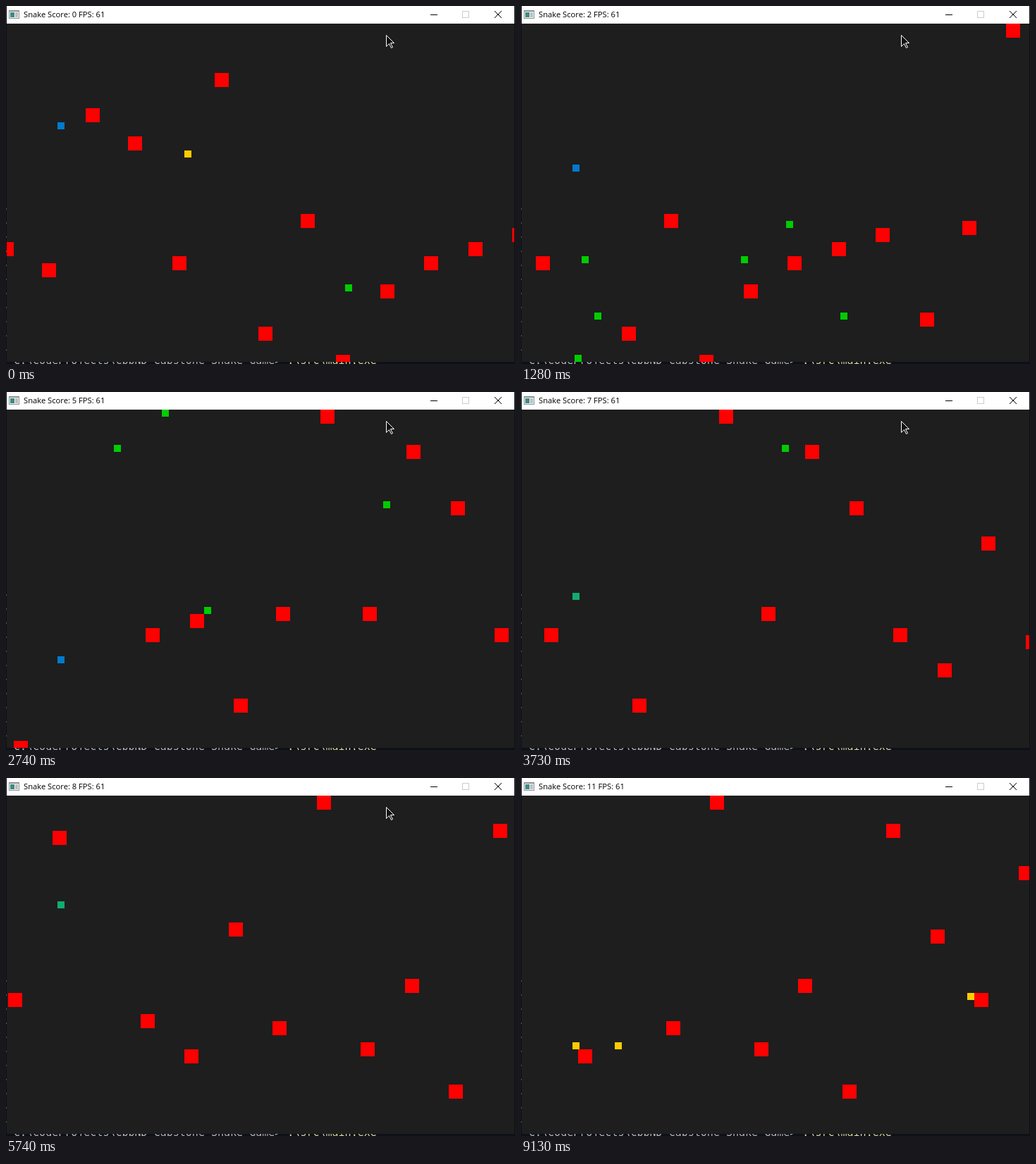
Animation of 722x508 px, one loop 9.28 s. Source, as an HTML page with a canvas:

```html
<!DOCTYPE html>
<html lang="en">
<head>
<meta charset="utf-8">
<title>Snake</title>
<style>
  html, body { margin: 0; width: 100%; height: 100%; overflow: hidden; background: #0c1018; }
  canvas { display: block; width: 722px; height: 508px; }
</style>
</head>
<body>
<canvas id="stage" width="722" height="508"></canvas>
<script>
const ctx = document.getElementById('stage').getContext('2d');
const LOOP = 9280;
const PLAYER_X = 73;
const SPEED = 0.16702; // enemy px per ms
const STEP = 2.5;      // enemy px per game tick
const END = 1132.5;    // scroll at game over

const rowY = row => 25 + 10 * row;
const scrollAt = t => Math.min(END, Math.round(t * SPEED / STEP) * STEP);
const overlaps = (y, enemyY) => y > enemyY - 10 && y < enemyY + 20;
const random = n => Math.abs(Math.sin(n * 12.9898) * 43758.5453) % 1;

function lerp(points, at) {
  const i = Math.max(1, points.findIndex(([p]) => at <= p));
  const [a, from] = points[i - 1], [b, to] = points[i];
  return from + (to - from) * (at - a) / (b - a);
}

// The player arrives at each stop [scroll, y] and fires there.
const stops = [
  [-22.5, 205], [10, 145], [37.5, 95], [250, 295], [280, 355], [300, 395],
  [487.5, 315], [507.5, 315], [527.5, 315], [735, 55], [945, 155], [975, 205],
  [1062.5, 305], [1095, 375], [1125, 375]
];

// It waits, then leaves just in time, twice as fast as the enemies.
function playerY(d) {
  const i = stops.findIndex(([at]) => d < at);
  if (i < 1) return stops[stops.length - 1][1];
  const from = stops[i - 1][1], [at, to] = stops[i];
  const y = to + Math.sign(from - to) * Math.min(Math.abs(from - to), 2 * (at - d));
  return rowY(Math.round((y - 25) / 10));
}

// Enemies enter one by one, about 25 ticks apart: [index, x at the start].
const entry = [[0, -9], [7, 418.5], [8, 468.5], [13, 781], [16, 963.5], [30, 1838.5]];
const rows = [
  31, 34, 12, 16, 33, 7, 43, 27, 47, 37, 33, 31, 29, 41, 28, 0,
  28, 5, 13, 31, 36, 18, 32, 0, 35, 26, 41, 4, 19, 28, 10
];
const enemies = rows.map((row, i) => {
  const x = Math.round((lerp(entry, i) - 1) / STEP) * STEP + 1;
  const y = rowY(row);
  const rammed = overlaps(playerY(x - 75), y) && x - 75 > 0;
  return { x, y, end: rammed ? x - 73 : Infinity };
});

// Each shot stops at the first enemy in its lane.
const shots = stops.map(([fired, y]) => {
  const target = enemies.find(e => e.end > fired && e.x > fired + PLAYER_X && overlaps(y, e.y));
  const hit = target ? (target.x - PLAYER_X - 10 + 8 * fired) / 9 : Infinity;
  if (hit > fired + 80) return { fired, y, end: Infinity };
  target.end = hit;
  return { fired, y, end: hit };
});

// Every enemy fires twice on its way across.
const enemyShots = enemies.flatMap((e, i) => [0, 1].map(n => {
  const from = 720 * random(2 * i + n + 1);
  return { from, fired: e.x - from, y: e.y };
}).filter(shot => shot.fired < e.end));

function rect(color, x, y, w, h) {
  ctx.fillStyle = color;
  ctx.fillRect(x, y, w, h);
}

const box = (color, x, y, size) => rect(color, Math.trunc(x), y, size, size);

function path(...points) {
  ctx.beginPath();
  points.forEach(([x, y]) => ctx.lineTo(x, y));
}

function text(str, x, y, font, color) {
  ctx.font = font;
  ctx.fillStyle = color;
  ctx.fillText(str, x, y);
  return x + ctx.measureText(str).width;
}

function clipped(x, y, w, h, paint) {
  ctx.save();
  ctx.beginPath();
  ctx.rect(x, y, w, h);
  ctx.clip();
  paint();
  ctx.restore();
}

function drawTerminal() {
  const mono = '15px "DejaVu Sans Mono", monospace';
  rect('#0c1018', 0, 0, 722, 508);
  for (let y = 287; y < 500; y += 20) rect('#555', 0, y, 1, 2);
  clipped(0, 505, 722, 3, () => {
    const x = text('C:\\CodeProjects\\CppND-Capstone-Snake-Game> ', 11, 508, mono, '#b4b4b4');
    text('.\\src\\main.exe', x, 508, mono, '#d9d3a0');
  });
}

function drawTitleBar(t) {
  // The caption refreshes once a second.
  const second = Math.floor((t - 260) / 1000);
  const d = scrollAt(260 + 1000 * second);
  const score = second < 0 ? 0 : shots.filter(shot => shot.end <= d).length;
  const fps = second === 4 ? 62 : 61;

  rect('#fff', 1, 0, 720, 25);
  rect('#8a9298', 4, 6, 15, 12);
  rect('#f2f4f5', 5, 8, 13, 9);
  rect('#3f8a80', 6, 9, 6, 7);
  rect('#b9c0c4', 13, 9, 4, 7);
  text(`Snake Score: ${score} FPS: ${fps}`, 25, 16, '11.2px "Open Sans", sans-serif', '#000');

  ctx.lineWidth = 1;
  ctx.strokeStyle = '#ccc';
  ctx.strokeRect(647.5, 7.5, 9, 9);
  rect('#000', 602, 12, 10, 1);
  ctx.strokeStyle = '#000';
  path([693, 7], [703, 17]);
  ctx.stroke();
  path([703, 7], [693, 17]);
  ctx.stroke();
}

function drawGame(t) {
  const d = scrollAt(t);
  rect('#1e1e1e', 1, 25, 720, 480);
  for (const { from, fired, y } of enemyShots) {
    if (d >= fired) box('#00cc00', from - 4 * (d - fired), y, 10);
  }
  for (const { x, y, end } of enemies) {
    if (d < end) box('#ff0000', x - d, y, 20);
  }
  for (const { fired, y, end } of shots) {
    if (d >= fired && d < end) box('#ffcc00', PLAYER_X + 8 * (d - fired), y, 10);
  }
  const color = t < 3700 ? '#007acc' : t < 7020 ? '#10ac70' : '#ffcc00';
  box(color, PLAYER_X, playerY(d), 10);
}

// The pointer rests, then swings out through the bottom right in nine jumps.
function drawCursor(t) {
  const p = Math.max(0, Math.ceil((t - 8659) / 470 * 9) / 9);
  if (p > 1 || t >= 9130) return;
  ctx.save();
  ctx.translate(Math.round(539 - 161 * p + 361 * p * p) + 0.5, Math.round(41 + 470 * p * p) + 0.5);
  path([0, 0], [0, 16], [4, 12], [7, 18], [9, 17], [6, 11], [11, 11]);
  ctx.closePath();
  ctx.fillStyle = '#101010';
  ctx.fill();
  ctx.strokeStyle = '#fff';
  ctx.lineWidth = 1;
  ctx.lineJoin = 'round';
  ctx.stroke();
  ctx.restore();
}

const start = performance.now();

function draw() {
  const t = (performance.now() - start) % LOOP;
  drawTerminal();
  drawTitleBar(t);
  clipped(1, 25, 720, 480, () => drawGame(t));
  drawCursor(t);
  requestAnimationFrame(draw);
}
draw();
</script>
</body>
</html>
```
